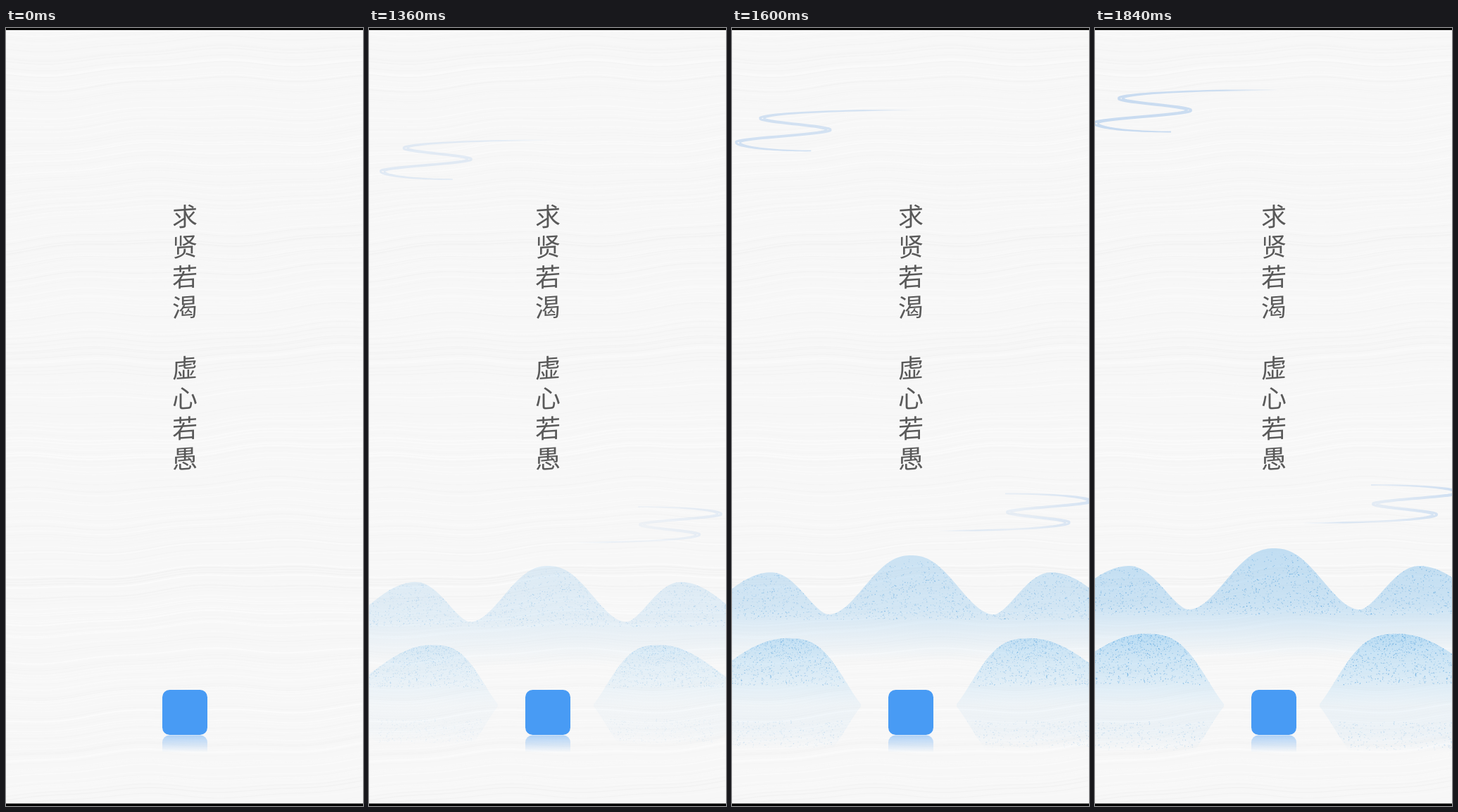
Animation, 507 px wide and 1105 px high, one loop 3000 ms. Source, as an HTML page with a canvas:

```html
<!DOCTYPE html>
<html lang="zh-CN">
<head>
<meta charset="utf-8">
<title>求贤若渴 虚心若愚</title>
<style>
html, body { margin: 0; width: 100%; height: 100%; overflow: hidden; background: #f7f7f7; }
canvas { position: absolute; left: 0; top: 0; display: block; }
.char {
  position: absolute; left: 232px; width: 44px;
  font: 400 36px/44px "Noto Sans CJK SC", "Noto Sans CJK", sans-serif;
  text-align: center; color: #595959; transform: skewY(-4deg);
}
</style>
</head>
<body>
<canvas id="stage" width="507" height="1105"></canvas>
<script>
const W = 507, H = 1105, LOOP = 3000, START = 1200, STEP = 40, STEPS = 15;
const ctx = document.getElementById('stage').getContext('2d');
const lerp = (a, b, u) => a + (b - a) * u;
const swing = u => (1 - Math.cos(Math.PI * u)) / 2;

function seeded(seed) {
  return () => {
    seed = (seed + 0x6D2B79F5) | 0;
    let n = Math.imul(seed ^ (seed >>> 15), 1 | seed);
    n = (n + Math.imul(n ^ (n >>> 7), 61 | n)) ^ n;
    return ((n ^ (n >>> 14)) >>> 0) / 4294967296;
  };
}

[...'求贤若渴 虚心若愚'].forEach((text, i) => {
  const el = document.createElement('div');
  el.className = 'char';
  el.textContent = text;
  el.style.top = 243 + 43 * i + 'px';
  document.body.append(el);
});

function makePaper() {
  const canvas = document.createElement('canvas');
  canvas.width = W;
  canvas.height = H;
  const g = canvas.getContext('2d'), rnd = seeded(11);
  g.fillStyle = '#f7f7f7';
  g.fillRect(0, 0, W, H);
  for (let y = -20; y < H + 40; y += 1.5 + rnd() * 4) {
    g.strokeStyle = rnd() < 0.5 ? `rgba(0,0,0,${0.004 + rnd() * 0.016})`
                                : `rgba(255,255,255,${0.1 + rnd() * 0.35})`;
    g.lineWidth = 0.6 + rnd() * rnd() * 2;
    g.beginPath();
    for (let x = -4; x <= W + 4; x += 6) {
      g.lineTo(x, y + 10 - x * 0.04 + 5 * Math.sin(x / 62 + y / 130) + 2 * Math.sin(x / 27 - y / 70));
    }
    g.stroke();
  }
  return canvas;
}

// Height between two crests or hollows; bend shifts the steep part
const slope = (x, x0, y0, x1, y1, bend) =>
  lerp(y0, y1, swing(Math.pow(Math.min(1, (x - x0) / (x1 - x0)), bend)));

function ridgeY(x) {
  const d = Math.abs(x - 254.5);
  if (d < 122) return slope(d, 0, 739, 122, 826, 1.15);
  if (d < 206) return slope(d, 122, 826, 206, 764, 0.82);
  return slope(d, 206, 764, 366, 848, 1);
}

const moundY = x => x < 70 ? slope(-x, -70, 860.5, 140, 960.5, 1)
                           : slope(x, 70, 860.5, 205, 975, 1.5);

function hill(height, x0, x1, base) {
  const path = new Path2D();
  path.moveTo(x0, base);
  for (let x = x0; x <= x1; x += 3) path.lineTo(x, height(x));
  path.lineTo(x1, base);
  path.closePath();
  return path;
}

function specks(seed, count, x0, x1, y0, y1, power, strength) {
  const rnd = seeded(seed);
  return Array.from({ length: count }, () => ({
    x: lerp(x0, x1, rnd()),
    y: lerp(y0, y1, Math.pow(rnd(), power)),
    size: 0.8 + rnd() * 0.5,
    color: `rgba(82,160,220,${strength * (0.25 + 0.75 * rnd())})`
  }));
}

// Winding stream from tip to tip, turning at each point between
function stream(points) {
  const path = new Path2D(), last = points.length - 2, n = 24;
  for (const dx of [-3, 3]) for (const dy of [-0.8, 0.8]) {
    for (let i = 0; i <= last; i++) {
      const [x0, y0] = points[i], [x1, y1] = points[i + 1];
      for (let k = 0; k <= n; k++) {
        const u = k / n, s = Math.sin(u * Math.PI / 2), c = 1 - Math.cos(u * Math.PI / 2);
        const fx = i === 0 ? s : i === last ? c : swing(u);
        const fy = i === 0 ? c : i === last ? s : u;
        const spread = i === 0 ? u : i === last ? 1 - u : 1;
        const x = lerp(x0, x1, fx) + dx * spread, y = lerp(y0, y1, fy) + dy * spread;
        if (i + k === 0) path.moveTo(x, y);
        else path.lineTo(x, y);
      }
    }
  }
  return path;
}

// stops: [offset, alpha] pairs
function fade(rgb, x0, y0, x1, y1, ...stops) {
  const grad = ctx.createLinearGradient(x0, y0, x1, y1);
  stops.forEach(([o, a]) => grad.addColorStop(o, `rgba(${rgb},${a})`));
  return grad;
}

const paper = makePaper();
const ridge = {
  path: hill(ridgeY, -70, 578, 895),
  fill: fade('152,202,238', 0, 739, 0, 895, [0, 0.57], [0.5, 0.47], [0.7, 0.28], [1, 0]),
  dots: specks(3, 2500, -60, 567, 744, 833, 0.85, 0.75)
};
const mound = {
  path: hill(moundY, -75, 183, 962),
  fill: fade('152,206,242', 0, 860, 0, 962, [0, 0.54], [0.5, 0.38], [1, 0.12]),
  dots: specks(5, 1500, -60, 183, 860, 932, 1.5, 0.8)
};
const echo = {
  path: mound.path,
  fill: fade('152,202,238', 0, 962, 0, 896, [0, 0.12], [0.6, 0.12], [1, 0]),
  dots: specks(6, 380, -20, 183, 898, 938, 1, 0.35)
};
const upperCloud = {
  path: stream([[258, 88], [36, 100], [134, 117], [1, 135], [108, 147.5]]),
  paint: fade('170,201,236', 0, 0, 260, 0, [0, 0.62], [0.7, 0.55], [1, 0])
};
const lowerCloud = {
  path: stream([[392, 649], [516, 660], [397, 676], [483, 691], [295, 703]]),
  paint: fade('170,201,236', 295, 0, 520, 0, [0, 0], [0.25, 0.4], [0.48, 0.25], [1, 0.55])
};

function scaleAbout(x, y, sx, sy) {
  ctx.translate(x, y);
  ctx.scale(sx, sy);
  ctx.translate(-x, -y);
}

function layer(paint) {
  ctx.save();
  paint();
  ctx.restore();
}

function paintHill({ path, fill, dots }) {
  ctx.fillStyle = fill;
  ctx.fill(path);
  ctx.clip(path);
  for (const dot of dots) {
    ctx.fillStyle = dot.color;
    ctx.fillRect(dot.x, dot.y, dot.size, dot.size);
  }
}

function drawCloud(cloud, pivotX, drop, p) {
  layer(() => {
    ctx.translate(0, drop * (1 - p));
    const s = lerp(0.904, 1, p);
    scaleAbout(pivotX, 0, s, s);
    ctx.strokeStyle = cloud.paint;
    ctx.lineWidth = 1.8;
    ctx.stroke(cloud.path);
  });
}

function drawRidge(p) {
  layer(() => {
    ctx.translate(0, 133.6 * (1 - p));
    const s = lerp(0.87, 1, p);
    scaleAbout(254.5, 0, s, s);
    paintHill(ridge);
  });
}

function drawMound(p, flip) {
  const s = lerp(0.765, 1, p);
  layer(() => {
    scaleAbout(251, 0, flip, 1);
    layer(() => {
      scaleAbout(183, 962, s, s);
      paintHill(mound);
    });
    // Mirror image in the water
    ctx.globalAlpha *= Math.min(1, Math.max(0, (p - 0.06) / 0.25));
    scaleAbout(183, 962, s, -s);
    paintHill(echo);
  });
}

function drawBadge() {
  ctx.fillStyle = '#489bf4';
  ctx.beginPath();
  ctx.roundRect(222, 940, 64, 64, 10.5);
  ctx.fill();
  ctx.fillStyle = fade('72,155,244', 0, 1004, 0, 1029, [0, 0.42], [1, 0]);
  ctx.beginPath();
  ctx.roundRect(222, 1004.5, 64, 25, [10, 10, 0, 0]);
  ctx.fill();
}

function draw(time) {
  const t = time % LOOP;
  const step = t < START ? 0 : Math.min(STEPS, Math.floor((t - START) / STEP) + 1);
  const p = step / STEPS;
  ctx.drawImage(paper, 0, 0);
  layer(() => {
    ctx.globalAlpha = Math.pow(p, 0.65);
    drawCloud(upperCloud, 277, 115.4, p);
    drawCloud(lowerCloud, 237, 109, p);
    drawRidge(p);
    drawMound(p, 1);
    drawMound(p, -1);
  });
  drawBadge();
  ctx.fillStyle = '#000';
  ctx.fillRect(0, 0, W, 3);
  ctx.fillRect(0, 1101.5, W, 4);
}

const origin = performance.now();
function tick() {
  draw(performance.now() - origin);
  requestAnimationFrame(tick);
}
tick();
</script>
</body>
</html>
```
